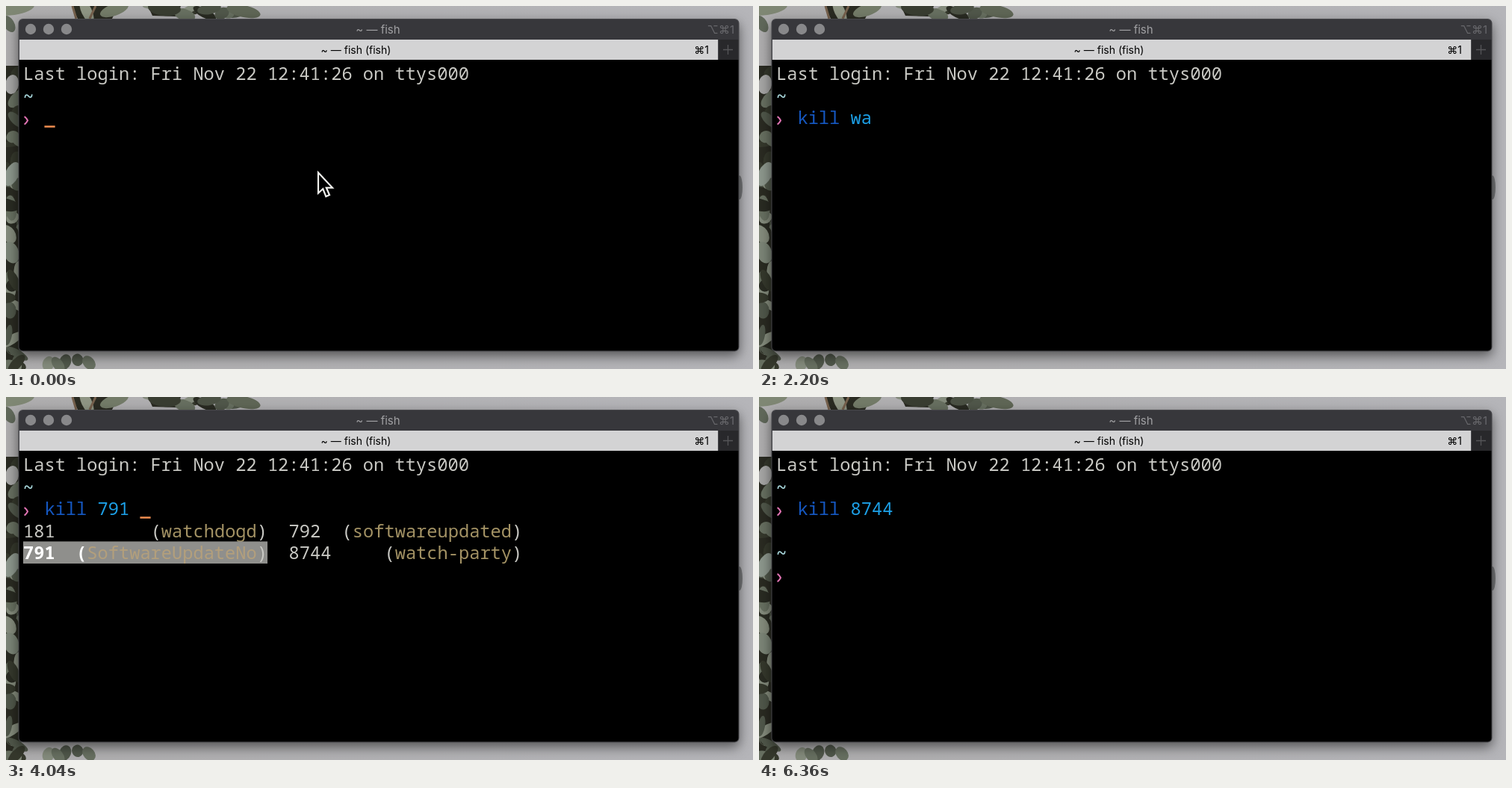
Recreate the animation shown at these times as an HTML page. Size 1000 by 486 pixels, loop 6400 ms.

```html
<!DOCTYPE html>
<html lang="en">
<head>
<meta charset="utf-8">
<title>Terminal</title>
<style>
html, body { margin: 0; width: 100%; height: 100%; overflow: hidden; background: #b2b2b5; }
svg { display: block; }
text { white-space: pre; }
.ui { font-family: Inter, "DejaVu Sans", sans-serif; }
.mono { font: 23.7px "Noto Sans Mono", "DejaVu Sans Mono", monospace; }
.shadow { filter: drop-shadow(0 6px 8px #0008); }
</style>
</head>
<body>
<svg width="1000" height="486" viewBox="0 0 1000 486">
  <defs>
    <linearGradient id="wall">
      <stop offset="0" stop-color="#aeadae"/>
      <stop offset="1" stop-color="#b5b5b9"/>
    </linearGradient>
  </defs>
  <rect width="1000" height="486" fill="url(#wall)"/>
  <g id="leaves"></g>
  <ellipse cx="982" cy="243" rx="4" ry="16" fill="#77787a"/>
  <rect class="shadow" x="16.5" y="17" width="965" height="445.5" rx="6" fill="#48484c"/>
  <path d="M17.5 45V23.5a5.5 5.5 0 0 1 5.5-5.5H975a5.5 5.5 0 0 1 5.5 5.5V45Z" fill="#37373b"/>
  <g fill="#88888a">
    <circle cx="33" cy="31" r="7.2"/><circle cx="57" cy="31" r="7.2"/><circle cx="81" cy="31" r="7.2"/>
  </g>
  <path d="M17.5 72H980.5V456.5a5 5 0 0 1-5 5H22.5a5 5 0 0 1-5-5Z"/>
  <rect x="18" y="45" width="935" height="27" fill="#d3d3d4"/>
  <rect x="954" y="45" width="26.5" height="27" fill="#28282b"/>
  <path d="M960 58.500H973M966.5 52V65" stroke="#555558" stroke-width="1.3"/>
  <g class="ui">
    <text x="498" y="36.5" font-size="15" text-anchor="middle" fill="#a0a0a3">~ — fish</text>
    <text x="975" y="36.5" font-size="15" text-anchor="end" fill="#68686c">⌥⌘1</text>
    <text id="tab" x="468.5" y="64" font-size="14" text-anchor="middle"></text>
    <text x="941" y="64" font-size="14" text-anchor="end">⌘1</text>
  </g>
  <g id="screen" class="mono"></g>
  <path id="pointer" d="M418 223V250.5L424.3 244.8L428.3 255L433 253L428.8 243.3H437Z"
        fill="#000" stroke="#efefec" stroke-width="2.2"/>
</svg>
<script>
const $ = id => document.getElementById(id);
const LOOP = 6400, CELL = 14.22, ROW = 29.6;
const PALE = '#c9c9c4', GOLD = '#a39264', BLUE = '#1557c0', CYAN = '#1c9fe6',
      AQUA = '#a4d2d6', PINK = '#e274b4', ORANGE = '#f08e50';

const colX = c => 23 + c * CELL;
const rowY = r => 75 + r * ROW;

// Foliage behind the window: seeded scatter plus a few large leaves
let seed = 11;
const rnd = () => (seed = seed * 16807 % 2147483647) / 2147483647;
const leaf = (x, y, a, b, turn, fill) =>
  `<ellipse rx="${a}" ry="${b}" fill="${fill}" transform="translate(${x} ${y}) rotate(${turn})"/>`;

function foliage() {
  const greens = ['#35382c', '#50574a', '#676f60', '#848b7c', '#292b22'];
  let s = '<path d="M0 80H17V486H0ZM88 0H150L142 17H96ZM190 0H234L228 14L196 13Z" fill="#2a2b22"/>';
  for (let i = 0; i < 42; i++)
    s += leaf(rnd() * 18, 85 + rnd() * 390, 8 + rnd() * 9, 4 + rnd() * 5, rnd() * 180, greens[i % 5]);
  for (let i = 0; i < 9; i++)
    s += leaf(195 + rnd() * 135, rnd() * 12, 9 + rnd() * 8, 4 + rnd() * 4, rnd() * 60 - 30, greens[i % 5]);
  for (let i = 0; i < 11; i++)
    s += leaf(rnd() * 120, 472 + rnd() * 16, 8 + rnd() * 7, 4 + rnd() * 4, rnd() * 180, greens[i % 4]);
  s += leaf(10, 3, 28, 9, -8, '#7f8774') + leaf(4, 24, 12, 7, 60, '#60685a')
     + leaf(108, 7, 17, 7, 65, '#8f9584') + leaf(145, 5, 20, 8, -20, '#737b68')
     + leaf(212, 3, 22, 10, 5, '#393d31') + leaf(272, 4, 16, 7, -10, '#4b5144')
     + leaf(318, 7, 23, 8, 12, '#5f6656') + leaf(8, 225, 9, 17, 25, '#8c968c')
     + leaf(7, 330, 10, 15, -20, '#7b8476') + leaf(8, 105, 9, 13, 10, '#a5a5a4');
  return s + '<path d="M89 0L94 17M120 0L112 17" stroke="#75604c" stroke-width="3"/>';
}
$('leaves').innerHTML = foliage();

const put = (col, row, str, fill, weight = 400) =>
  `<text x="${colX(col)}" y="${rowY(row) + 24}" fill="${fill}" font-weight="${weight}">${str}</text>`;
const box = (col, row, cols, y, h, fill) =>
  `<rect x="${colX(col)}" y="${rowY(row) + y}" width="${cols * CELL}" height="${h}" fill="${fill}"/>`;
const prompt = row =>
  `<path d="M24.5 ${rowY(row) + 14}q2 .5 4.5 5q-2.5 4.5-4.5 5" fill="none" stroke="${PINK}" stroke-width="2"/>`;

// Process choices: id, name, first column, row, column of the bracket
const choices = [
  ['181', 'watchdogd', 0, 3, 12],
  ['791', 'SoftwareUpdateNo', 0, 4, 5],
  ['792', 'softwareupdated', 25, 3, 30],
  ['8744', 'watch-party', 25, 4, 34]
];

function choice([pid, name, col, row, open], picked, bold) {
  const end = open + name.length + 1;
  const head = bold ? '#fff' : PALE, weight = bold ? 700 : 400;
  return (picked ? box(col, row, end + 1 - col, 0, ROW, '#8f8f8c') : '')
    + put(col, row, pid, head, weight) + put(open, row, '(', head, weight)
    + put(open + 1, row, name, picked ? (bold ? '#b39f7c' : '#9a8866') : GOLD)
    + put(end, row, ')', PALE);
}

// Each key press: time, typed command, picked choice (-1 = list only), phase
const keys = [
  [0, ''], [640, 'k'], [760, 'ki'], [880, 'kil'], [960, 'kill'], [1160, 'kill '],
  [1360, 'kill w'], [1520, 'kill wa'], [2320, 'kill wa', -1],
  [3200, 'kill 181 ', 0], [3920, 'kill 791 ', 1], [4240, 'kill 792 ', 2], [4560, 'kill 8744 ', 3],
  [5440, 'kill 8744 ', undefined, 'run'], [5800, 'kill 8744 ', undefined, 'done']
];

function draw(index, cursorOn) {
  const [, cmd, pick, phase] = keys[index];
  const [verb, arg = ''] = cmd.split(' ');
  let s = put(0, 0, 'Last login: Fri Nov 22 12:41:26 on ttys000', PALE)
    + put(0, 1, '~', AQUA, 600) + prompt(2) + put(2, 2, verb, BLUE) + put(7, 2, arg, CYAN);
  if (pick !== undefined)
    s += choices.map((c, i) => choice(c, i === pick, i === pick && i > 0)).join('');
  if (phase === 'done') s += put(0, 4, '~', AQUA, 600) + prompt(5);
  const [col, row] = phase === 'run' ? [0, 3] : phase === 'done' ? [2, 5] : [2 + cmd.length, 2];
  if (cursorOn) s += box(col, row, 1, 26, 2.5, ORANGE);
  $('screen').innerHTML = s;
  $('tab').textContent = phase === 'run' ? 'hongmanhdo: kill 8744\u00a0 — kill (fish)' : '~ — fish (fish)';
  $('pointer').style.display = index ? 'none' : '';
}

let shown = '';
function tick(now) {
  const t = now % LOOP;
  const index = keys.findLastIndex(k => k[0] <= t);
  const cursorOn = (t - keys[index][0]) % 1000 < 500;
  const state = index + '/' + cursorOn;
  if (state !== shown) draw(index, cursorOn);
  shown = state;
  requestAnimationFrame(tick);
}
tick(0);
</script>
</body>
</html>
```
